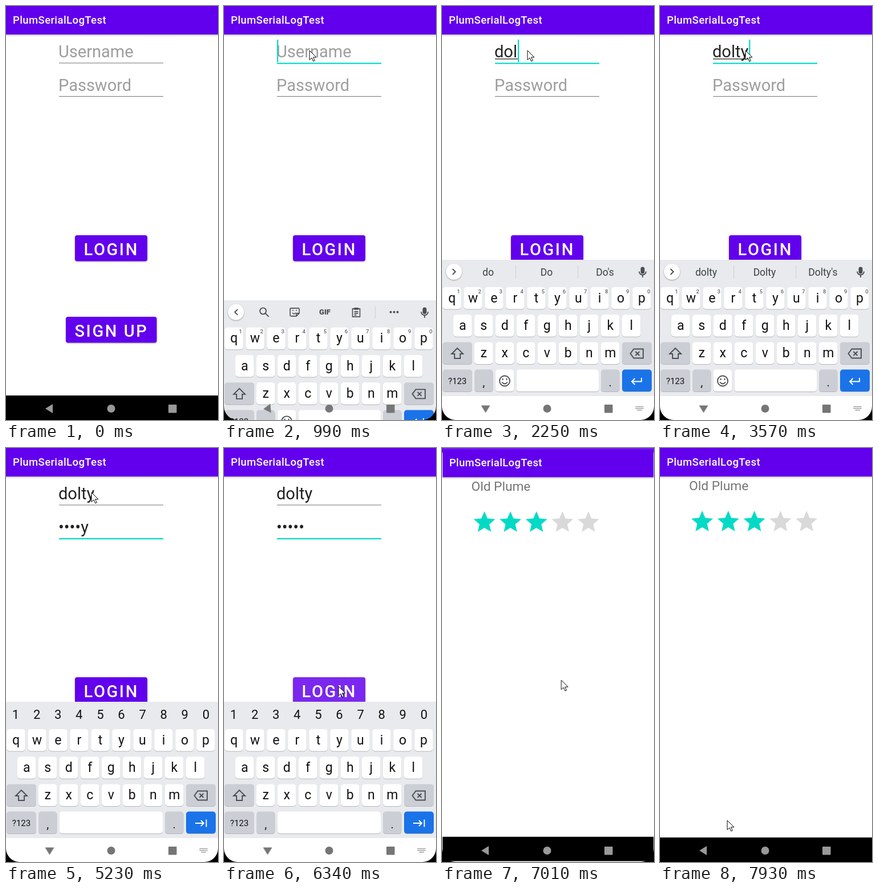
These frames come from a looping animation (372 px wide and 726 px high, 7990 ms). An HTML page:

```html
<!DOCTYPE html>
<html lang="en">
<head>
<meta charset="utf-8">
<title>Login demo</title>
<style>
  html, body { margin: 0; width: 100%; height: 100%; overflow: hidden; background: #fff; }
  svg { display: block; width: 100%; height: 100%; }
  text { font-family: Roboto, sans-serif; white-space: pre; }
  .title { font-size: 18.5px; font-weight: 500; letter-spacing: .4px; fill: #fff; }
  .field { font-size: 29px; fill: #212121; }
  .hint { fill: #9e9e9e; }
  .button { font-size: 29px; font-weight: 500; letter-spacing: 2.6px; fill: #fff; }
  .raised { filter: drop-shadow(0 1.5px 1px #0005); }
  .show { font-size: 22.8px; fill: #757575; }
  .key { font-size: 23px; text-anchor: middle; fill: #111; }
  .small { font-size: 9.5px; font-weight: 500; text-anchor: middle; fill: #5f6368; }
  .word { font-size: 17.5px; text-anchor: middle; fill: #3c4043; }
  .line { fill: none; stroke: #4a4d51; stroke-width: 1.9; }

  #login, #nav, #back, #page, #rating, #keyboard, #mouse { animation: 7990ms linear infinite; }
  #login { animation-name: press; }
  #nav { animation-name: tint; }
  #back { animation-name: turn; transform-origin: 76.5px 706px; }
  #page { animation-name: leave; transform-origin: 186px 363px; }
  #rating { animation-name: enter; transform-origin: 186px 363px; }
  #keyboard { animation-name: slide; }
  #mouse { animation-name: move; }

  @keyframes press {
    0%, 76.8% { fill: #6200ee; }
    77.9%, 80.5% { fill: #7a28ef; }
    82.5%, 100% { fill: #6200ee; }
  }
  @keyframes tint {
    0%, 11% { fill: #999; }
    12.5%, 81.5% { fill: #757575; }
    83.3%, 85% { fill: #4a4a4a; }
    87.5%, 100% { fill: #999; }
  }
  @keyframes turn {
    0%, 12.2% { transform: rotate(0deg); }
    14.89% { transform: rotate(-75deg); }
    15.6%, 85% { transform: rotate(-90deg); }
    87.6%, 100% { transform: rotate(0deg); }
  }
  @keyframes slide {
    0%, 10.76% { transform: translateY(281px); animation-timing-function: cubic-bezier(0, 0, .2, 1); }
    14.89% { transform: translateY(2px); }
    15.6%, 80.1% { transform: translateY(0); animation-timing-function: cubic-bezier(.4, 0, 1, 1); }
    83.3%, 100% { transform: translateY(281px); }
  }
  @keyframes leave {
    0%, 83.73% { transform: scale(1); }
    84.23% { transform: scale(1.0087); }
    85.5% { transform: scale(1.09); }
    88.5%, 100% { transform: scale(1.15); }
  }
  @keyframes enter {
    0%, 83.73% { transform: scale(.85); opacity: 0; }
    84.4% { transform: scale(.87); opacity: 0; }
    85.5% { transform: scale(.96); opacity: 1; }
    86.6% { transform: scale(.99); opacity: 1; }
    88.5%, 100% { transform: scale(1); opacity: 1; }
  }
  @keyframes move {
    0%, 4.12% { transform: translate(372px, 330px); opacity: 0; }
    4.13% { transform: translate(362px, 310px); opacity: 1; }
    6.5% { transform: translate(262px, 185px); }
    9.14%, 67.6% { transform: translate(150px, 78px); }
    70.5% { transform: translate(165px, 180px); }
    73.5% { transform: translate(191px, 350px); }
    76%, 79.6% { transform: translate(201px, 418px); }
    84.23% { transform: translate(206px, 417px); }
    88.5% { transform: translate(210px, 405px); }
    91% { transform: translate(208px, 275px); }
    94% { transform: translate(150px, 420px); }
    96.6% { transform: translate(88px, 590px); }
    98.9%, 100% { transform: translate(118px, 653px); opacity: 1; }
  }
</style>
</head>
<body>
<svg viewBox="0 0 372 726">
  <defs>
    <linearGradient id="shade" x2="0" y2="1">
      <stop stop-color="#0003"/><stop offset="1" stop-color="#0000"/>
    </linearGradient>
    <g id="frame">
      <path fill="#fff" d="M0 0h372v726H0z"/>
      <path fill="url(#shade)" d="M0 50h372v4H0z"/>
      <path fill="#6200ee" d="M0 0h372v50H0z"/>
      <path d="M0 683h372v43H0z"/>
      <text class="title" x="12" y="30.5">PlumSerialLogTest</text>
    </g>
    <path id="star" d="M12 17.27 18.18 21l-1.64-7.03L22 9.24l-7.19-.61L12 2 9.19 8.63 2 9.24l5.46 4.73L5.82 21z"/>
  </defs>

  <g id="page">
    <use href="#frame"/>
    <g id="fields"></g>
    <rect id="login" class="raised" x="121" y="402" width="127" height="45.5" rx="4"/>
    <text class="button" x="136.5" y="436.5">LOGIN</text>
    <rect class="raised" x="105" y="545" width="159.5" height="45.5" rx="4" fill="#6200ee"/>
    <text class="button" x="120.5" y="579.5">SIGN UP</text>
  </g>

  <g id="rating">
    <use href="#frame"/>
    <text class="show" x="51" y="74">Old Plume</text>
    <g id="stars"></g>
  </g>

  <g id="keyboard">
    <path fill="#e8eaed" d="M0 445h372v239H0z"/>
    <path fill="#fff" d="M0 684h372v44H0z"/>
    <g fill="#8a8a8a">
      <path d="M339 702h15v1.5h-15zM339 705h15v1.5h-15zM342 708h9v1.5h-9z" stroke="#fff" stroke-width=".8" stroke-dasharray="1 1.5"/>
    </g>
    <g id="keys"></g>

    <g id="strip">
      <circle class="raised" cx="21" cy="466" r="14" fill="#fff"/>
      <g class="line">
        <rect x="349.5" y="458.5" width="5" height="10" rx="2.5" fill="#4a4d51"/>
        <path d="M346 465.500a6 6 0 0 0 12 0M352 472v4"/>
      </g>
    </g>
    <g id="tools">
      <g class="line">
        <path d="M24 461l-5 5 5 5"/>
        <circle cx="68.500" cy="464" r="5.500"/><path d="M72.500 468l6 6"/>
        <path d="M118 459h12a2 2 0 0 1 2 2v7l-5 5h-9a2 2 0 0 1-2-2v-10a2 2 0 0 1 2-2zM132 468h-5v5M120 467q3 4 6 0M121 462v2M127 462v2" stroke-width="1.6"/>
        <path d="M225.500 460h13v14h-13zM229 459h6v2h-6zM228.500 465h7M228.500 468h7M228.500 471h4" stroke-width="1.6"/>
      </g>
      <text x="177" y="470.500" text-anchor="middle" font-size="13" font-weight="900" fill="#4a4d51">GIF</text>
      <path fill="#cfd2d6" d="M265 456h1v21h-1z"/>
      <g fill="#4a4d51"><circle cx="292.500" cy="466" r="2"/><circle cx="298.500" cy="466" r="2"/><circle cx="304.500" cy="466" r="2"/></g>
    </g>
    <g id="words">
      <path class="line" d="M18.500 461l5 5-5 5"/>
      <path fill="#cfd2d6" d="M129 455h1v23h-1zM238 455h1v23h-1z"/>
      <text class="word" x="81" y="473"></text>
      <text class="word" x="183.500" y="473"></text>
      <text class="word" x="286" y="473"></text>
    </g>
    <g id="digits"></g>

    <g class="line">
      <path d="M27 600l-10 10h5v8h10v-8h5z"/>
      <path d="M336.500 601.500h16.500v16h-16.500l-6-8zM339.500 606l7 7M346.500 606l-7 7"/>
      <g id="emoji"><circle cx="110" cy="657.500" r="9"/><path d="M105 659.500q5 6 10 0M106.500 653v3M113.500 653v3"/></g>
      <g stroke="#fff">
        <path id="enter" d="M350 652v6.500h-17M338.500 653l-5.500 5.500 5.500 5.500"/>
        <path id="tab" d="M332 658h15M342 653l5 5-5 5M351.500 651.500v13"/>
      </g>
    </g>
  </g>

  <g id="nav">
    <path id="back" d="M69 706l13-8v16z"/>
    <circle cx="184.500" cy="706" r="7"/>
    <rect x="285" y="699" width="14.500" height="14.500" rx="1"/>
  </g>
  <path d="M0 702a24 24 0 0 0 24 24H0zM372 702a24 24 0 0 1-24 24h24z"/>

  <path id="mouse" d="M0 0v16.500l4-3.600 2.700 6 2.600-1.200-2.700-5.800h5.400z" fill="#fff" stroke="#000" stroke-width="1"/>
</svg>

<script>
const LOOP = 7990, NAME = 'dolty', TEAL = '#03dac5';
const $ = id => document.getElementById(id);

function add(parent, tag, attrs, text = '') {
  const el = document.createElementNS('http://www.w3.org/2000/svg', tag);
  for (const k in attrs) el.setAttribute(k, attrs[k]);
  el.textContent = text;
  return parent.appendChild(el);
}
const toggle = (el, on) => { el.style.display = on ? '' : 'none'; };
const within = (t, spans) => spans.some(([a, b]) => t >= a && t < b);

// Keyboard
const rowY = r => 493 + 48.2 * r;
function key(x, row, w, label = '', fill = '#fff', size = 23, drop = 26.5) {
  const y = rowY(row);
  add($('keys'), 'rect', { x, y: y + 1, width: w, height: 38.5, rx: 5, fill: '#b4b7bc' });
  const cap = add($('keys'), 'rect', { x, y, width: w, height: 38.5, rx: 5, fill });
  add($('keys'), 'text', { class: 'key', x: x + w / 2, y: y + drop, style: `font-size:${size}px` }, label);
  return cap;
}
[['qwertyuiop', 1.2], ['asdfghjkl', 20], ['zxcvbnm', 57]].forEach(([letters, x0], row) =>
  [...letters].forEach((c, i) => key(x0 + 37 * i, row, 32.5, c)));
const GREY = '#cbced4';
key(1, 2, 52, '', GREY);
key(316, 2, 52, '', GREY);
key(1, 3, 52, '?123', GREY, 15, 25.5);
key(57, 3, 32.5, ',', GREY, 20, 29);
const emojiKey = key(93.7, 3, 32.5);
const space = key(130.5, 3, 144.5);
const spaceShadow = space.previousElementSibling;
key(279, 3, 32.5, '.', GREY, 20, 29);
key(316, 3, 52, '', '#1a73e8');
const hints = add($('keys'), 'g', {});
[...'1234567890'].forEach((d, i) => {
  add(hints, 'text', { class: 'small', x: 29 + 37.1 * i, y: 503.5 }, d);
  add($('digits'), 'text', { class: 'key', x: 17 + 37.1 * i, y: 475, style: 'font-size:22px' }, d);
});

for (let i = 0; i < 5; i++)
  add($('stars'), 'use', {
    href: '#star', fill: i < 3 ? TEAL : '#d9d9d9',
    transform: `translate(${51.2 + 45.8 * i} 106.2) scale(1.9)`
  });

// Text fields
function makeField(y, label) {
  const g = $('fields');
  const hint = add(g, 'text', { class: 'field hint', x: 92, y }, label);
  const text = add(g, 'text', { class: 'field', x: 92, y });
  const mark = add(g, 'rect', { x: 93, y: y + 2.2, height: 1.3, fill: '#212121' });
  const rule = add(g, 'rect', { x: 93, y: y + 9.5, width: 183 });
  const caret = add(g, 'rect', { y: y - 31, width: 2.2, height: 39.5, fill: TEAL });
  return (value, focus, caretOn, marked) => {
    text.textContent = value;
    const w = value ? text.getComputedTextLength() : 0;
    toggle(hint, !value);
    toggle(caret, caretOn);
    caret.setAttribute('x', 93 + w);
    mark.setAttribute('width', marked ? w : 0);
    rule.setAttribute('height', focus ? 2.2 : 1);
    rule.setAttribute('fill', focus ? TEAL : '#757575');
  };
}
const userField = makeField(90, 'Username');
const passField = makeField(148.5, 'Password');

const userKeys = [1920, 2050, 2180, 2310, 2380];
const passKeys = [4230, 4360, 4500, 4630, 4760];
const count = (keys, t) => keys.filter(k => k <= t).length;
const words = $('words').querySelectorAll('text');

function render(t) {
  const n = count(userKeys, t), p = count(passKeys, t);
  const inUser = t >= 950 && t < 3770, inPass = t >= 3770;

  userField(NAME.slice(0, n), inUser,
    within(t, [[950, 1450], [1920, 3110], [3570, 3770]]), inUser);
  const last = t < 6210 ? NAME.slice(p - 1, p) : '•';
  passField(p ? '•'.repeat(p - 1) + last : '', inPass,
    within(t, [[3770, 5230], [5730, 6230]]), false);

  // Suggestions trail the typing by one letter
  const word = NAME.slice(0, t < 2580 ? Math.max(1, n - 1) : n);
  const cap = word[0].toUpperCase() + word.slice(1);
  [word, cap, cap + "'s"].forEach((s, i) => { words[i].textContent = s; });

  toggle($('tools'), !n);
  toggle($('words'), n && !inPass);
  for (const el of [$('strip'), $('emoji'), $('enter'), emojiKey, emojiKey.previousElementSibling, hints])
    toggle(el, !inPass);
  toggle($('digits'), inPass);
  toggle($('tab'), inPass);
  for (const el of [space, spaceShadow]) {
    el.setAttribute('x', inPass ? 93.7 : 130.5);
    el.setAttribute('width', inPass ? 181.3 : 144.5);
  }
}

const start = performance.now() - 15;
function tick() {
  render((performance.now() - start) % LOOP);
  requestAnimationFrame(tick);
}
tick();
</script>
</body>
</html>
```
